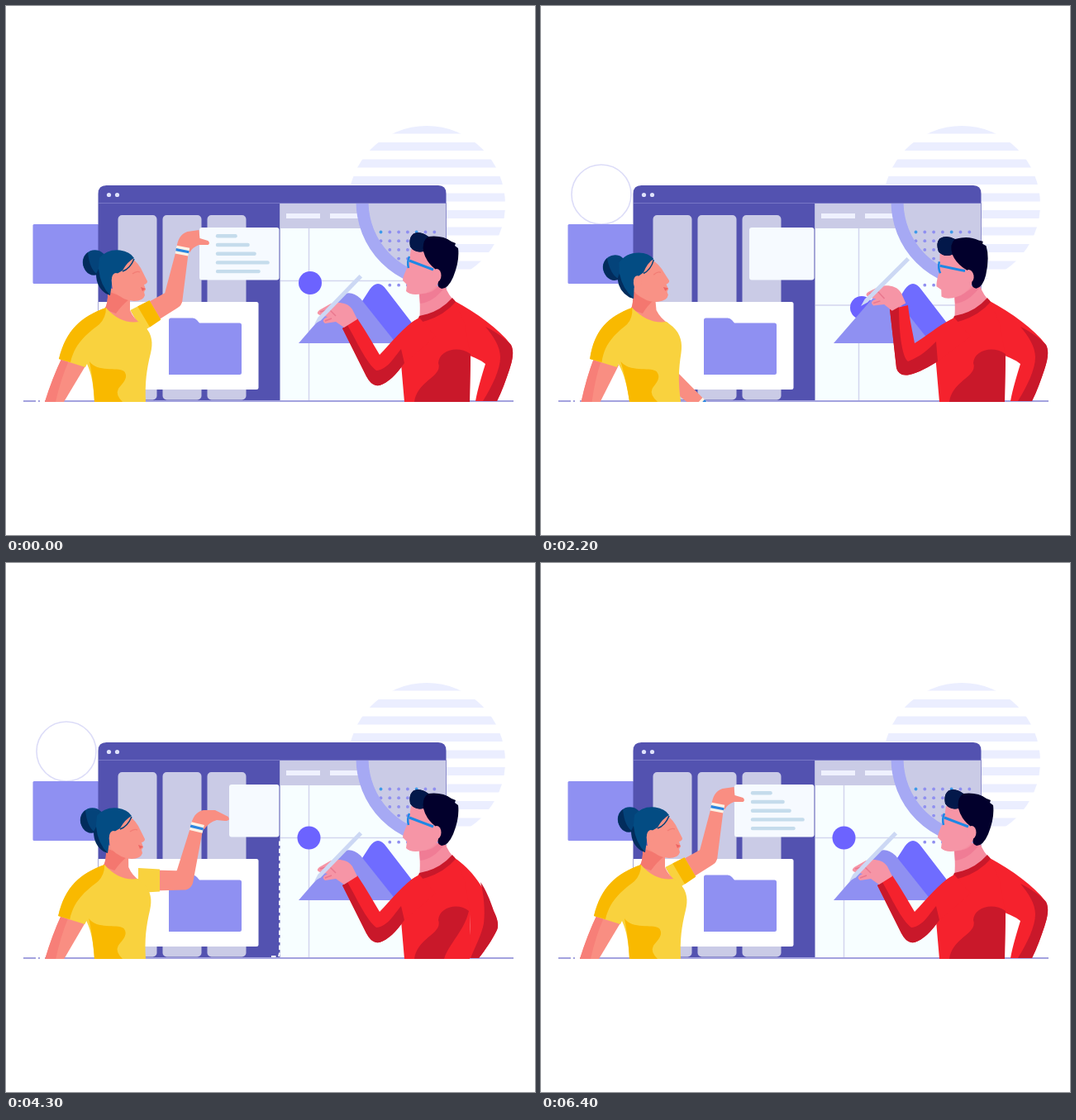
Write an HTML page that moves like this. It is 640 by 640 pixels and loops after 6.5 s.

```html
<!DOCTYPE html>
<html lang="en">
<head>
<meta charset="utf-8">
<title>Design team at work</title>
<style>
  html, body { margin: 0; width: 100%; height: 100%; overflow: hidden; background: #fff; }
  svg { display: block; width: 100vw; height: 100vh; }
</style>
</head>
<body>
<svg viewBox="0 0 640 640">
  <defs>
    <clipPath id="discClip"><circle cx="509" cy="240" r="95"/></clipPath>
    <clipPath id="panelClip"><path d="M331.500 238H532V478H331.500Z"/></clipPath>
    <clipPath id="groundClip"><path d="M0 0H640V479H0Z"/></clipPath>
  </defs>

  <g id="stripes" fill="#ebeeff" clip-path="url(#discClip)"></g>
  <circle id="ring" cx="73" cy="228" r="36" fill="none" stroke="#dcdcf8" stroke-width="1.600" pathLength="100" transform="rotate(-90 73 228)"/>
  <rect x="32.500" y="264" width="80" height="72" rx="1.500" fill="#8f90f2"/>

  <path d="M111.500 478V227Q111.500 217 121.500 217H523Q532.500 217 532.500 227V478Z" fill="#5352b0"/>
  <circle cx="124.500" cy="228.500" r="2.600" fill="#dfe2fb"/>
  <circle cx="134.500" cy="228.500" r="2.600" fill="#dfe2fb"/>
  <g id="columns" fill="#cacbe6"></g>

  <g clip-path="url(#panelClip)">
    <path d="M331 238H532V478H331Z" fill="#f7feff"/>
    <path id="guides" fill="none" stroke="#d3d5ee" stroke-width="1.500"/>
    <path d="M331 238H532V269H331Z" fill="#cacbe6"/>
    <path d="M339 251H380V257H339ZM392 251H430V257H392Z" fill="#eff1ff"/>
    <circle cx="528.500" cy="236.500" r="97.500" fill="#cacbe6"/>
    <g id="dots"></g>
    <circle cx="528.500" cy="236.500" r="97.500" fill="none" stroke="#a6a9f4" stroke-width="15"/>
    <path d="M398 408L440 343Q450 329 460 343L510 408Z" fill="#6f6cff"/>
    <circle id="ball" r="14" fill="#6c63ff"/>
    <path d="M354 408L400 355Q414 340 429 354L472 408Z" fill="#8f90f2"/>
  </g>
  <path d="M112 238.500H532" stroke="#7776c6"/>
  <path d="M532.500 238V340" stroke="#8d8dcb"/>

  <path id="dashes" fill="none" stroke="#fff" stroke-width="1.800"/>
  <path d="M112 358H303Q305.500 358 305.500 360.500V462Q305.500 464 303 464H112Z" fill="#fff"/>
  <path d="M197 446V380Q197 377.500 199.500 377.500H226Q229 377.500 231 380L234 383.500H282.500Q285 383.500 285 386V443.500Q285 446 282.500 446Z" fill="#8f90f2"/>
  <rect id="card" y="268" height="63.500" rx="3" fill="#f6faff"/>
  <g id="lines" stroke="#c5dcec" stroke-width="4.400" stroke-linecap="round"></g>

  <path d="M21 478H36M39 478H41M47 478H614" stroke="#a3a2de" stroke-width="2"/>

  <g clip-path="url(#groundClip)">
    <!-- woman -->
    <g id="hip">
      <path d="M68 425L97 434L70 479H47Q56 450 68 425Z" fill="#f98e82"/>
      <path d="M68 425L76 429Q66 452 60 479H47Q56 450 68 425Z" fill="#f77f78"/>
    </g>
    <path id="arm" fill="#f98e82"/>
    <path id="hand" fill="#f98e82"/>
    <g id="band">
      <path d="M-8 -5H8V5H-8Z" fill="#fdf3e6"/>
      <path d="M-8 -1.500H8V1.700H-8Z" fill="#2b86df"/>
    </g>
    <path id="sleeve" fill="#f9d23e"/>
    <path id="cuff" fill="#f9b900"/>
    <g id="torso">
      <path d="M123 340L150 350V368Q154 378 163 384L140 386L119 367Q124 360 123 340Z" fill="#f98e82"/>
      <path d="M123 345L149 355Q140 362 133 372L119 367Q124 360 123 345Z" fill="#f4776f"/>
      <path d="M121 365C133 379 146 384 161 382L168 388C177 397 178 408 175 420C170 440 168 455 169 479H107C106 460 104 446 98 433L96 437L64 427C73 391 91 376 121 365Z" fill="#f9d23e"/>
      <path d="M121 365C91 376 73 391 64 427L78 431C84 405 102 394 113 385Q121 377 121 365Z" fill="#f9b900"/>
      <path d="M101 430C111 444 134 436 143 442C149 450 141 456 136 463Q132 470 141 479H107C106 460 104 446 101 430Z" fill="#f9b900"/>
    </g>
    <g id="head">
      <path d="M150 303Q161 311 166 323L171 333Q171 336 167 337L169 343L167 346L168 350Q166 357 155 357Q142 357 129 344L126 320Z" fill="#f99286"/>
      <path d="M163 340L169 342L165 345Z" fill="#ee6563"/>
      <path d="M153 324Q158 320 162 322" fill="none" stroke="#f27d75" stroke-width="1.300"/>
      <circle cx="107.500" cy="310" r="14.700" fill="#04437a"/>
      <path d="M99 298Q89 307 96 320Q102 328 111 325Q101 319 99 298Z" fill="#022c5c"/>
      <path d="M113 305Q122 294 138 295.500Q150 297 155 305Q147 309 141 320L134 324Q126 326 128 336L126 350Q113 344 111 326Z" fill="#034c83"/>
      <path d="M112 318Q114 338 126 350L121 348Q109 340 109 324Z" fill="#022c5c"/>
      <path d="M155 306Q150 318 141 321" fill="none" stroke="#04437a" stroke-width="1.500"/>
      <ellipse cx="133" cy="330" rx="5" ry="7" fill="#f99286"/>
    </g>

    <!-- man -->
    <path id="backArm" fill="#f5222d"/>
    <path id="backShade" fill="#c9182a"/>
    <path d="M499 340L531 338Q535 350 543 357L500 380Q502 364 499 340Z" fill="#f58da0"/>
    <path d="M500 347Q514 350 524 338L531 340Q518 358 501 360Z" fill="#f07c95"/>
    <path d="M497 379Q525 374 542 355L555 384L562 424L561 479H482L476 410Q479 388 497 379Z" fill="#f5222d"/>
    <path d="M500 375Q524 371 540 353L544 358Q527 378 496 384Z" fill="#c9182a"/>
    <path id="fold" fill="#c9182a"/>
    <path id="frontArm" fill="#f5222d"/>
    <path id="frontShade" fill="#c9182a"/>
    <g id="fist">
      <path d="M-7 5L9 -5L3 -17C-3 -26 -14 -26 -23 -24L-37 -16Q-42 -12 -36 -10L-27 -8Q-36 -4 -30 0L-17 -2Z" fill="#f695a6"/>
      <path d="M-36 -14L-25 -17L-17 -9M-30 -3L-22 -6" fill="none" stroke="#e9788f" stroke-width="1.500"/>
    </g>
    <path id="pen" d="M0 0L9 -2.500H81V2.500H9Z" fill="#ccd8f4"/>
    <g id="face">
      <path d="M490 294L522 300L527 330Q518 346 504 348Q490 351 484 345L485 337L480 332Q480 327 487 313Z" fill="#f695a6"/>
      <path d="M489 291Q487 280 493 275.500Q502 272 511 279Q528 277 539 285L544 287L543 290L547 293Q549 308 541 328Q535 342 527 342Q521 340 523 334L519 318Q508 309 505 297Q494 299 489 291Z" fill="#02002c"/>
      <path d="M489 291Q487 280 493 275.500Q501 272 511 279Q503 284 505 297Q494 299 489 291Z" fill="#03184a"/>
      <path d="M488 308L517 319" stroke="#1e88e5" stroke-width="3"/>
      <path d="M488 303Q485 310 487 317" fill="none" stroke="#1e88e5" stroke-width="2.500"/>
      <ellipse cx="521" cy="326" rx="5.500" ry="8" fill="#f695a6"/>
    </g>
  </g>
</svg>
<script>
const LOOP = 6500, STEP = 100;
const $ = id => document.getElementById(id);
const set = (id, name, value) => $(id).setAttribute(name, value);
const clamp = x => Math.min(1, Math.max(0, x));
const ease = x => x * x * (3 - 2 * x);

// Blends numbers, arrays, or path strings with the same commands.
function mix(a, b, k) {
  if (typeof a === 'number') return a + (b - a) * k;
  if (Array.isArray(a)) return a.map((v, i) => mix(v, b[i], k));
  const other = b.match(/-?[\d.]+/g);
  let i = 0;
  return a.replace(/-?[\d.]+/g, n => mix(+n, +other[i++], k).toFixed(2));
}

function at(t, keys) {
  let i = keys.findIndex(k => k[0] > t);
  if (i < 0) return keys[keys.length - 1][1];
  if (i === 0) return keys[0][1];
  const [t0, a] = keys[i - 1], [t1, b] = keys[i];
  return a === b ? a : mix(a, b, ease((t - t0) / (t1 - t0)));
}

// Static repeats
let html = '';
for (let i = 0; i < 10; i++) html += `<rect x="410" y="${144.500 + i * 20.500}" width="200" height="10"/>`;
$('stripes').innerHTML = html;

$('columns').innerHTML = [135.500, 189.500, 243.500].map(x =>
  `<rect x="${x}" y="253" width="47" height="223.500" rx="5"/>`).join('');

html = '';
for (const row of [0, 1, 2, 3, 6]) {
  for (let col = row === 6 ? 1 : 0; col < 7; col++) {
    const fill = row === 0 && col % 4 === 0 ? '#3f9bea' : '#8f8ff0';
    html += `<circle cx="${453.500 + col * 10.800}" cy="${273.500 + row * 10.700}" r="1.900" fill="${fill}"/>`;
  }
}
$('dots').innerHTML = html;

const textRows = [[26, .4], [41, .2], [49, .27], [65, .4], [54, .1]];
$('lines').innerHTML = textRows.map((_, i) => `<path id="line${i}"/>`).join('');

// Woman's arm: shoulder, elbow, forearm angle and length, hand turn, cuff shade
const pose = (joints, hand) => [joints, hand];
const palm = 'M-8,-6C-9,-14 -4,-20 3,-22L15,-21L16,-15L31,-14Q34,-11 31,-9L18,-7Q12,-4 8,2Z';
const raised = pose([158, 381, 202, 355, -79, 60, 0, 1],
  'M-7,-3C-6,-14 -2,-20 6,-23L20,-25L21,-15L31,-12Q34,-9 31,-7L20,-7Q12,-4 9,2Z');
const offer = pose([150, 386, 206, 402, -78, 62, 0, 0], palm);
const rest = pose([146, 392, 147, 441, 42, 63, 118, 0], palm);
const reach = pose([160, 384, 215, 384, -76, 66, 0, 0],
  'M-7,-4C-4,-16 2,-20 8,-21L22,-21L38,-13L39,-10Q38,-8 34,-8L24,-9Q14,-6 9,2Z');
const grab = pose([166, 382, 217, 365, -62, 55, 0, 1],
  'M-7,-4C-2,-14 4,-18 9,-19L20,-19L26,-14L29,-5Q35,-3 32,-1L22,0Q14,0 8,6Z');
const armKeys = [[200, raised], [1400, offer], [2200, rest], [3600, rest],
  [4300, reach], [4800, grab], [5600, raised]];

// Body lean, head shift and head turn
const leanKeys = [[700, [0, 0, 0, 0]], [1400, [-14, -14, 2.500, -5]], [2100, [-15, -15, 2.500, -6]],
  [3600, [-15, -15, 2.500, -6]], [4300, [-2.500, -3, 1, 0]], [4800, [9.500, 9.500, 1, 1]], [5600, [0, 0, 0, 0]]];

// Man's drawing arm: sleeve, shade, then wrist, hand turn, pen tip, pen angle
const draw = [
  'M407,390L425,378C437,396 446,412 452,422C466,408 480,388 500,377L520,400L482,432C472,446 462,456 452,459C444,460 440,455 436,448Z',
  'M407,390L413,386C424,405 436,432 448,441C462,440 470,424 478,415L482,432C472,446 462,456 452,459C444,460 440,455 436,448Z',
  [416, 384, 0, 373, 385, -46]];
const hold = [
  'M422,367L444,362C446,380 450,396 452,408C466,400 478,388 500,377L520,400L480,430C470,436 456,444 446,446C436,448 432,444 430,438Z',
  'M422,367L433,364C433,390 436,424 444,430C460,424 470,414 478,406L480,430C470,436 456,444 446,446C436,448 432,444 430,438Z',
  [432, 364, 3, 387, 363, -45]];
const point = [
  'M399,364L416,355C424,374 432,392 438,405C456,396 476,388 500,377L520,400L479,426C466,430 446,437 434,437C424,437 420,432 416,424Z',
  'M399,364L406,361C414,385 420,405 428,411C446,412 466,408 478,402L479,426C466,430 446,437 434,437C424,437 420,432 416,424Z',
  [408, 359, 33, 372, 339, -18]];
const drawKeys = [[700, draw], [1400, hold], [2200, hold], [3300, point], [3550, point], [4200, draw]];

// Man's other arm: sleeve, shade, fold of the jumper
const bent = [
  'M543,357C570,372 596,390 611,410C615,418 613,428 609,440C605,452 600,466 594,478L568,478C571,462 576,446 580,433C574,428 566,425 561,423L540,400Z',
  'M580,388C592,394 604,402 611,410C615,418 613,428 609,440C605,452 600,466 594,478L577,478C588,460 598,440 598,425C598,412 590,400 580,388Z',
  'M562,421C547,410 524,416 523,432C529,449 497,453 494,479L561,479C561,460 562,440 562,421Z'];
const tucked = [
  'M543,357C563,370 580,394 590,421C595,431 597,440 593,446C588,456 580,468 572,478L556,478C560,462 562,446 562,433C562,428 562,425 561,423L540,400Z',
  'M574,386C580,394 586,408 590,421C595,431 597,440 593,446C588,456 580,468 572,478L562,478C567,466 576,448 578,436C580,420 578,400 574,386Z',
  'M560,421C547,410 524,416 523,432C529,449 497,453 494,479L530,479C536,460 554,446 560,421Z'];
const backKeys = [[2850, bent], [3450, tucked], [5000, tucked], [6200, bent]];

const home = [366.500, 332.500], away = [384.500, 362];

// Tapered limb from p to q, rounded at q unless cap is off
function limb(px, py, qx, qy, r0, r1, cap = true) {
  const d = Math.hypot(qx - px, qy - py) || 1;
  const nx = (py - qy) / d, ny = (qx - px) / d;
  const join = cap ? `A${r1} ${r1} 0 0 0 ` : 'L';
  return `M${px - nx * r0} ${py - ny * r0}L${px + nx * r0} ${py + ny * r0}` +
    `L${qx + nx * r1} ${qy + ny * r1}${join}${qx - nx * r1} ${qy - ny * r1}Z`;
}

function drawWoman(t) {
  const [[sx, sy, ex, ey, angle, len, turn, shade], hand] = at(t, armKeys);
  const a = angle * Math.PI / 180;
  const wx = ex + Math.cos(a) * len, wy = ey + Math.sin(a) * len;
  set('arm', 'd', limb(sx, sy, ex, ey, 13, 11.500) + limb(wx, wy, ex, ey, 7.500, 11.500));
  set('hand', 'd', hand);
  set('hand', 'transform', `translate(${wx} ${wy}) rotate(${turn})`);
  set('band', 'transform', `translate(${wx} ${wy}) rotate(${angle + 90})`);

  const d = Math.hypot(ex - sx, ey - sy);
  const along = n => [sx + (ex - sx) * n / d, sy + (ey - sy) * n / d];
  set('sleeve', 'd', limb(sx, sy, ...along(26), 15, 13.500, false));
  set('cuff', 'd', limb(...along(10), ...along(26), 14.500, 13.500, false));
  set('cuff', 'opacity', shade);

  const [lean, dx, dy, tilt] = at(t, leanKeys), k = lean / 158;
  const skew = base => `matrix(1 0 ${-k} 1 ${k * base} 0)`;
  set('torso', 'transform', skew(478));
  set('hip', 'transform', skew(462));
  set('head', 'transform', `translate(${dx} ${dy}) rotate(${tilt} 140 340)`);
}

function drawMan(t) {
  const [sleeve, shade, [wx, wy, turn, px, py, tilt]] = at(t, drawKeys);
  set('frontArm', 'd', sleeve);
  set('frontShade', 'd', shade);
  set('fist', 'transform', `translate(${wx} ${wy}) rotate(${turn})`);
  set('pen', 'transform', `translate(${px} ${py}) rotate(${tilt})`);
  const [back, backShade, fold] = at(t, backKeys);
  set('backArm', 'd', back);
  set('backShade', 'd', backShade);
  set('fold', 'd', fold);
  const nod = at(t, [[100, 0], [1300, -9], [2200, -9], [2900, 0]]);
  set('face', 'transform', `rotate(${nod} 525 345)`);
}

// Dashed trail: down, right, then up to the card's corner
function drawTrail(t) {
  const from = 270 * clamp((t - 3700) / 1400), to = 270 * clamp((t - 2580) / 1110);
  const spot = s => s < 36 ? [240, 440 + s] : s < 127 ? [204 + s, 476] : [331, 603 - s];
  let d = '';
  for (let s = 0; s < 270; s += 9) {
    const a = Math.max(s, from), b = Math.min(s + 5.500, to);
    if (b > a) d += `M${spot(a)}L${spot(b)}`;
  }
  set('dashes', 'd', d);
}

function drawBoard(t) {
  const left = at(t, [[1500, 234], [2150, 252], [2550, 252], [3300, 270], [4850, 270], [5600, 234]]);
  set('card', 'x', left);
  set('card', 'width', 330.500 - left);

  textRows.forEach(([width, part], i) => {
    const grown = t < 4000
      ? at(t, [[100, 1], [1400, part], [2000, 0]])
      : ease(clamp((t - 5650 - i * 20) / 670));
    const w = width * grown - 4.400;
    set('line' + i, 'd', w > 0 ? `M256 ${278.300 + i * 10.700}h${w}` : '');
  });

  const [gx, gy] = at(t, [[1450, home], [2150, away], [2200, away], [2800, home]]);
  set('guides', 'd', `M${gx} 238V478M332 ${gy}H532`);
  const [bx, by] = at(t, [[0, [368, 335]], [1400, [388, 365]], [2200, [388, 365]], [2800, home]]);
  set('ball', 'cx', bx);
  set('ball', 'cy', by);

  const drawn = 100 * clamp(t / 1400), gone = 100 * clamp((t - 4900) / 700);
  set('ring', 'stroke-dasharray', `0 ${gone} ${drawn - gone} 200`);
  set('ring', 'visibility', drawn > gone ? 'visible' : 'hidden');
  drawTrail(t);
}

const start = performance.now();
function frame() {
  const t = Math.floor((performance.now() - start) % LOOP / STEP) * STEP;
  drawBoard(t);
  drawWoman(t);
  drawMan(t);
  requestAnimationFrame(frame);
}
frame();
</script>
</body>
</html>
```
